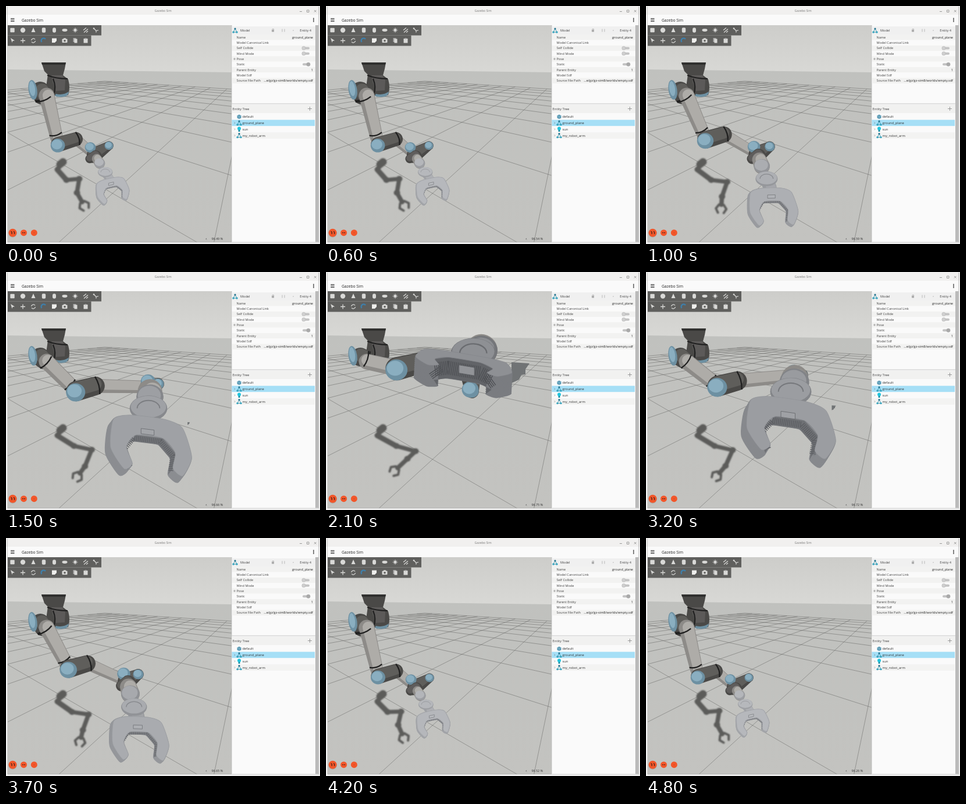
Recreate the animation shown at these times as an HTML page. Size 540 by 409 pixels, loop 4.9 s.

```html
<!DOCTYPE html>
<html lang="en">
<head>
<meta charset="utf-8">
<title>Robot arm simulation</title>
<style>
  html, body { margin: 0; width: 100%; height: 100%; overflow: hidden; background: #fafafa; }
  svg { display: block; width: 540px; height: 409px; font-family: "Open Sans", "Noto Sans", sans-serif; }
</style>
</head>
<body>
<svg viewBox="0 0 540 409" xmlns="http://www.w3.org/2000/svg">
  <defs>
    <linearGradient id="sky" x1="0" y1="0" x2="0" y2="1">
      <stop offset="0" stop-color="#cdcdca"/><stop offset="1" stop-color="#d9d9d6"/>
    </linearGradient>
    <linearGradient id="ground" x1="0" y1="0" x2="0" y2="1">
      <stop offset="0" stop-color="#c0c1be"/><stop offset="1" stop-color="#c3c3c0"/>
    </linearGradient>
    <clipPath id="view"><rect x="3" y="33" width="385" height="373"/></clipPath>
    <filter id="soft" x="-20%" y="-20%" width="140%" height="140%"><feGaussianBlur stdDeviation="1.1"/></filter>
  </defs>
  <g clip-path="url(#view)">
    <rect x="3" y="33" width="385" height="87" fill="url(#sky)"/>
    <path d="M3 109L388 114V406H3Z" fill="url(#ground)"/>
    <path id="grid" fill="none" stroke="#60615f" stroke-width=".5"/>
    <g id="shadow" filter="url(#soft)"/>
    <g id="arm"/>
  </g>
  <g id="ui"/>
  <text id="percent" x="373" y="402" font-size="5.4" fill="#333" text-anchor="end"/>
</svg>
<script>
const $ = id => document.getElementById(id);
const LOOP = 4900, STEP = 100;
const RISE_START = 600, RISE_END = 2060, FALL_START = 2770;

const DARK = "#4a4947", DARK_LIT = "#646361", BLUE = "#6d90a2", BLUE_LIT = "#8aaec0";
const TUBE = "#8d8b88", TUBE_LIT = "#b7b5b1", SHADE = "#5c5c5a";

const mix = (a, b, k) => a + (b - a) * k;
const clamp = (v, lo = 0, hi = 1) => Math.min(hi, Math.max(lo, v));
const between = (p, q, k) => [mix(p[0], q[0], k), mix(p[1], q[1], k)];
const add = (p, x, y) => [p[0] + x, p[1] + y];
const polar = (p, r, degrees) => add(p, r * Math.cos(degrees * Math.PI / 180), r * Math.sin(degrees * Math.PI / 180));
const grey = v => `rgb(${v},${v + 2},${v + 6})`;
const bezier = (s, ...pts) => {
  while (pts.length > 1) pts = pts.slice(1).map((p, i) => between(pts[i], p, s));
  return pts[0];
};

// Drawing helpers
const path = (d, fill, more = "") => `<path d="${d}" fill="${fill}" ${more}/>`;
const line = (d, color, w, more = "") => path(d, "none", `stroke="${color}" stroke-width="${w}" ${more}`);
const poly = pts => "M" + pts.map(p => p.join(" ")).join("L");
const rect = (x, y, w, h, fill, more = "") => `<rect x="${x}" y="${y}" width="${w}" height="${h}" fill="${fill}" ${more}/>`;
const oval = ([x, y], rx, ry, fill, more = "") => `<ellipse cx="${x}" cy="${y}" rx="${rx}" ry="${ry}" fill="${fill}" ${more}/>`;
const dot = (x, y, r, fill, more) => oval([x, y], r, r, fill, more);
const text = (x, y, s, size = 5.6, fill = "#404040", anchor = "start") =>
  `<text x="${x}" y="${y}" font-size="${size}" fill="${fill}" text-anchor="${anchor}">${s}</text>`;

function limb(a, ar, b, br, fill, light) {
  const len = Math.hypot(b[0] - a[0], b[1] - a[1]) || 1;
  const nx = (a[1] - b[1]) / len, ny = (b[0] - a[0]) / len;
  const capsule = (size, shift) => {
    const end = (p, r, side) => add(p, nx * r * (size * side + shift), ny * r * (size * side + shift));
    const arc = (r, to) => `A${r * size} ${r * size} 0 0 1 ${to}`;
    return `M${end(a, ar, 1)}${arc(ar, end(a, ar, -1))}L${end(b, br, -1)}${arc(br, end(b, br, 1))}Z`;
  };
  return path(capsule(1, 0), fill) + path(capsule(.72, -.2), light, 'opacity=".8"');
}
function ring(a, b, k, r) {
  const len = Math.hypot(b[0] - a[0], b[1] - a[1]) || 1;
  const tx = (b[0] - a[0]) / len, ty = (b[1] - a[1]) / len, p = between(a, b, k);
  return line(`M${add(p, -ty * r, tx * r)}Q${add(p, tx * 5, ty * 5)} ${add(p, ty * r, -tx * r)}`, "#1f1f1f", 2.3);
}
function smooth(pts) {
  const n = pts.length, at = i => pts[(i + n) % n], t = .11;
  const handle = (p, a, b) => add(p, (b[0] - a[0]) * t, (b[1] - a[1]) * t);
  return `M${pts[0]}` + pts.map((p, i) =>
    `C${handle(p, at(i - 1), at(i + 1))} ${handle(at(i + 1), at(i + 2), p)} ${at(i + 1)}`).join("") + "Z";
}
const cap = (p, r) => oval(p, r, r * .95, BLUE) + oval(add(p, -r * .12, -r * .15), r * .75, r * .68, BLUE_LIT);

// Joint layout for lift s: 0 hanging down, 1 reaching forward
function layout(s) {
  const shoulder = [66, 148];
  const elbow = polar(shoulder, 93 - 34 * s ** 1.3, 75 - 57 * s);
  const wrist = bezier(s, [152, 256], [240, 283], [285, 108], [248, 165]);
  const neck = bezier(s, [178, 297], [269, 375], [239, 150], [240, 141]);
  const across = bezier(s, [27, -6], [55, 4], [93, 16], [83, 14]);
  const swing = s ** 4;
  return {
    s, shoulder, elbow, wrist, neck, across,
    forward: bezier(s, [10, 38], [10, 88], [16, 138], [-5, 28]),
    depth: bezier(s, [-1, 2], [-5, 3], [-16, 12], [-2, 36]),
    elbowEnd: add(elbow, 30 + 6 * s, -9),
    roll: add(between(wrist, neck, .35), 22 * swing, -22 * swing),
    flange: add(between(wrist, neck, .72), 11 * swing, -8 * swing),
    capTop: add(wrist, -7 * (1 - s), 50 * swing - 13),
    capSide: add(wrist, 25 - 22 * s, 16 * s - 16 + 40 * swing),
    size: 13 + 7 * s ** .7,
    span: Math.hypot(...across),
    tone: Math.round(182 - 40 * s ** .8)
  };
}

function base(toward) {
  const start = [59, 146], len = Math.hypot(toward[0] - 59, toward[1] - 146);
  return path("M61 97H103L101 108L98 119L107 126Q111 140 107 153L88 156L68 146L72 118L66 112Z", DARK) +
    path("M61 97H103L102 101H62Z", "#30302f") +
    path("M78 119L97 119L102 128L101 145L85 146L80 130Z", DARK_LIT, 'opacity=".7"') +
    line("M71 119Q86 125 106 125M81 125Q87 140 82 152", "#202020", 2.2) +
    path("M86 151Q98 154 108 147Q107 156 98 156Q88 157 84 154Z", BLUE) +
    limb(start, 16, between(start, toward, 9 / len), 15, DARK, DARK_LIT) + ring(start, toward, 13 / len, 14) +
    oval([46, 144], 7.5, 17, BLUE, 'transform="rotate(-8 46 144)"') +
    oval([45, 142], 5, 13, BLUE_LIT, 'transform="rotate(-8 45 142)"');
}

// A flat two-jaw plate in the across/forward plane, extruded along depth
function gripper({ s, neck, across, forward, depth, tone }) {
  const place = ([x, y]) => add(neck, across[0] * x + forward[0] * y, across[1] * x + forward[1] * y);
  const half = [[.42, 0], [.85, .12], [1, .65], [.72, 1.02], [.5, .9], [.6, .6], [.33, .36]];
  const right = half.map(place), left = half.map(([x, y]) => place([-x, y]));
  const outline = smooth([...left, ...right.reverse()]);
  const inner = [...left.slice(4), ...right.slice(0, 3)];
  const under = k => inner.map(p => add(p, depth[0] * k, depth[1] * k));
  const layers = Array.from({ length: 10 }, (_, i) => 1 - i / 10).map(k =>
    path(outline, grey(tone - 20), `transform="translate(${depth[0] * k} ${depth[1] * k})" stroke="${grey(tone - 20)}" stroke-width="2"`));
  const slot = add(place([.05, .2]), depth[0] * .6, depth[1] * .6), [sx, sy] = [across[0] * .16, across[1] * .16];
  const h = 2 + 5 * s;
  const slotShape = poly([add(slot, -sx, -sy - h), add(slot, sx, sy - h), add(slot, sx, sy + h), add(slot, -sx, h - sy)]) + "Z";
  return path("M-4 0L27 2L20 12V21L13 22L9 30L-4 36Z", "#707375", `transform="translate(${place([1, 0])}) scale(${s ** 3})"`) +
    layers.join("") +
    path(poly([...inner, ...under(1).reverse()]) + "Z", grey(tone - 44)) +
    line(poly(under(.5)), grey(tone - 62), Math.hypot(...depth) * .65, 'stroke-dasharray="1.5 1.7"') +
    path(outline, grey(tone), `stroke="${grey(tone - 12)}" stroke-width=".6"`) +
    path(slotShape, grey(tone + 4), `stroke="${grey(tone - 50)}" stroke-width=".9"`);
}

function drawArm(pose) {
  const { s, shoulder, elbow, elbowEnd, wrist, roll, flange, capTop, capSide, size, span, tone, neck } = pose;
  const tubeEnd = between(shoulder, elbow, .86), fr = span * .46, thin = 8 + 5 * s;
  $("arm").innerHTML =
    base(tubeEnd) + limb(add(shoulder, 4, 6), 13.5, tubeEnd, 11 + 3 * s, TUBE, TUBE_LIT) + ring([59, 146], tubeEnd, .18, 14) +
    limb(elbowEnd, thin + 1.5, wrist, thin, TUBE, TUBE_LIT) +
    ring(shoulder, elbow, .8, 11 + 3 * s) +
    limb(elbow, size, elbowEnd, size * .92, DARK, DARK_LIT) + ring(elbow, elbowEnd, 1.1, size * .9) +
    cap(add(elbow, -1, 2), size * .95) +
    limb(wrist, size, capSide, size * .6, DARK, DARK_LIT) + cap(capSide, size * .58) +
    cap(capTop, size * .72) +
    limb(add(wrist, -size * .6, size * .5), size * .6, add(wrist, 2, 3), size * .85, DARK, DARK_LIT) +
    limb(between(wrist, roll, .45), span * .3, roll, span * .33, TUBE, TUBE_LIT) +
    oval(roll, span * .33, span * .3, grey(tone - 26)) + oval(add(roll, -1, -2), span * .28, span * .24, grey(tone - 2)) +
    limb(flange, fr * .62, neck, fr * .6, grey(tone - 22), grey(tone - 4)) +
    oval(flange, fr, fr * .68, grey(tone - 24)) + oval(add(flange, 0, -fr * .08), fr * .94, fr * .58, grey(tone)) +
    line(`M${add(flange, -fr * .6, 0)}A${fr * .6} ${fr * .42} 0 0 1 ${add(flange, fr * .6, 0)}`, grey(tone - 36), fr * .06) +
    gripper(pose);
}

function drawShadow(s) {
  const bump = Math.sin(Math.PI * s), early = s ** .4;
  const top = [98, 268], bend = [88, 281];
  const elbow = [104 + 17 * early, 299], wrist = [126 + 28 * early, 297 + 11 * early];
  const hand = [122 + 18 * early, 321 + 13 * bump], tool = [131 - 8 * s, 337 + 9 * bump];
  const len = Math.hypot(tool[0] - hand[0], tool[1] - hand[1]);
  const tx = (tool[0] - hand[0]) / len, ty = (tool[1] - hand[1]) / len;
  const jaw = (f, side) => add(tool, tx * f - ty * side, ty * f + tx * side);
  const stroke = (pts, w) => line(poly(pts), SHADE, w, 'stroke-linecap="round" stroke-linejoin="round"');
  $("shadow").innerHTML =
    stroke([top, [93, 272]], 13) + stroke([bend, elbow], 9) + stroke([top, bend], 8) + stroke([elbow, wrist], 7) + stroke([wrist, hand, tool], 7.5) +
    [elbow, wrist, hand].map(p => oval(p, 5.5, 5, SHADE)).join("") +
    stroke([jaw(14, -5), jaw(7, -9), jaw(0, -4), jaw(0, 4), jaw(7, 9), jaw(14, 5)], 4);
}

// Ground plane: a square lattice seen in two-point perspective
function drawGrid() {
  const alpha = .0335, beta = .0525, size = 20;
  const project = (a, b) => {
    const w = 1 - alpha * a - beta * b;
    return [(170 + 190 * alpha * a - 420 * beta * b) / w, (129 - 106 * (alpha * a + beta * b)) / w];
  };
  let d = "";
  for (let i = 0; i <= size; i++) {
    const endB = Math.min(size, (.98 - alpha * i) / beta), endA = Math.min(size, (.98 - beta * i) / alpha);
    if (endB > 0) d += poly([project(i, 0), project(i, endB)]);
    if (endA > 0) d += poly([project(0, i), project(endA, i)]);
  }
  $("grid").setAttribute("d", d);
}

function windowFrame() {
  return rect(0, 0, 540, 15, "#f1f0ef") + rect(0, 15, 540, 18, "#fafafa") + rect(0, 33, 3, 376, "#f4f4f4") +
    rect(2, 1, .7, 405, "#bdbdbd") + rect(3, 406, 537, 3, "#eeeeee") + rect(3, 405.5, 535, .7, "#a9a9a9") +
    text(270, 10, "Gazebo Sim", 5.3, "#777", "middle") + text(27, 26.5, "Gazebo Sim", 6.7, "#222") +
    line("M8 21.5H14.5M8 24H14.5M8 26.5H14.5", "#222", 1) +
    [21.5, 24, 26.5].map(y => dot(529, y, .9, "#222")).join("") +
    line("M505 9.5H509M517.5 7H521V10.5H517.5ZM530 7L533.5 10.5M533.5 7L530 10.5", "#777", .7);
}

function toolbars() {
  const pale = "#d9d9d7", bar = "#5f5f5d";
  const icons = [
    [rect(-3.7, -3.7, 7.4, 7.4, pale, 'rx="1"'), dot(0, 0, 4.2, pale), path("M0 -4.5L3.5 3.5H-3.5Z", pale),
      rect(-3.2, -4.2, 6.4, 8.4, pale, 'rx="2"'), rect(-3, -4.2, 6, 8.4, pale, 'rx="3"'), oval([0, 0], 4.5, 2.4, pale),
      dot(0, 0, 2.4, pale) + line("M0 -4.5V4.5M-4.5 0H4.5M-3 -3L3 3M3 -3L-3 3", pale, .8),
      line("M-4 0L1 -4M-3 4L4 -2M1 4L4 1.5", pale, 1.2), line("M-4 -3L0 1L4 0M0 1V4", pale, 1.2) + dot(-4, -3, 1.3, pale)],
    [path("M-3 -4.5L4 0L.5 .5L-.5 3.5Z", pale), line("M-4 0H4M0 -4V4", pale, 1.3),
      line("M-3.5 -.5A3.6 3.6 0 0 1 3 -2M3.5 .5A3.6 3.6 0 0 1 -3 2", pale, 1.3), line("M-3.5 2.5A4 4 0 0 1 3 -2.5", "#3e7fab", 2.4),
      rect(-4, -4, 8, 7.5, "#eeeeec") + path("M1 3.5L4 .5V3.5Z", "#555"),
      rect(-4.5, -3, 9, 6.5, pale, 'rx="1"') + rect(-2, -4.2, 4, 2, pale) + dot(0, .3, 1.8, bar),
      rect(-3.5, -4.5, 5, 7, "#aaa") + rect(-1.5, -3, 5, 7, pale), rect(-3.5, -3.5, 7, 7.5, pale) + rect(-1.5, -4.5, 3, 2, "#aaa")]
  ];
  return rect(3, 33, 161, 17.5, bar) + rect(3, 50.5, 143.5, 18, bar) +
    icons.map((row, j) => row.map((icon, i) => `<g transform="translate(${11 + 18 * i} ${41.5 + 18 * j})">${icon}</g>`).join("")).join("");
}

const modelIcon = (x, y) => `<g transform="translate(${x} ${y})">` + line("M0 -3L-3 3H3Z", "#2f8fa8", .9) +
  dot(0, -3, 1.6, "#24738c") + dot(-3, 3, 1.7, "#36a3bd") + dot(3, 3, 1.7, "#36a3bd") + "</g>";

function inspector() {
  const toggle = (y, on) => rect(510, y - 2, 12, 4, "#c3c3c3", 'rx="2"') +
    dot(on ? 520 : 512, y, 3.2, on ? "#a9a9a9" : "#cfcfcf", 'stroke="#aaa" stroke-width=".4"');
  const rows = [["Name", "ground_plane"], ["Model Canonical Link"], ["Self Collide"], ["Wind Mode"], ["Pose"], ["Static"],
    ["Parent Entity", "1"], ["Model Sdf"], ["Source File Path", "…e/gz/gz-sim8/worlds/empty.sdf"]];
  const rowY = i => 53.8 + i * 9.3;
  return rect(388, 33, 150, 372.5, "#fafafa") + rect(387.6, 33, .8, 372, "#b9b9b9") + rect(388.5, 35, 144, 14, "#f0f0f0") +
    modelIcon(394, 42) + text(403, 44, "Model") + text(525, 44, "Entity 4", 5.7, "#404040", "end") +
    rect(457, 41, 4, 3.4, "#aaa") + line("M458 41V39.5H460.5V41M475 39.5V44.5M479 39.5V44.5", "#aaa", .8) + dot(494, 42, .7, "#aaa") +
    rows.map(([label, value = ""], i) => rect(388.5, rowY(i) - 4.6, 144, 9.3, i % 2 ? "#fafafa" : "#f2f2f1") +
      text(396.5, rowY(i) + 2, label) + text(528, rowY(i) + 2, value, 5.6, "#222", "end")).join("") +
    toggle(rowY(2)) + toggle(rowY(3)) + toggle(rowY(5), true) + line("M391 91H395M393 89V93", "#777", .6);
}

function entityTree() {
  const cube = path("M401 186.5L404.5 188.3V192.5L401 194.3L397.5 192.5V188.3Z", "#5c9bb5") +
    line("M397.5 188.3L401 190L404.5 188.3M401 190V194", "#9acbdc", .5);
  const bulb = dot(401, 210.5, 3, "#20c5dd") + rect(399.6, 213, 2.8, 3, "#1590a5");
  return rect(388.5, 167.5, 149, .8, "#bdbdbd") + rect(388.5, 169, 144, 15, "#f1f1f0") + text(389.5, 179, "Entity Tree", 5.9) +
    line("M519 176.5H526M522.5 173V180", "#777", .7) +
    ["default", "ground_plane", "sun", "my_robot_arm"].map((label, i) => {
      const y = 190.2 + i * 10.8;
      return rect(388.5, y - 5.4, 142.5, 10.8, i === 1 ? "#a6dff6" : i % 2 ? "#f3f3f2" : "#fafafa") + text(406.5, y + 2.2, label, 5.8, "#333") +
        (i ? line(`M392.5 ${y - 1.5}L394 ${y}L392.5 ${y + 1.5}`, "#777", .6) : "") + (i % 2 ? modelIcon(401, y) : "");
    }).join("") + cube + bulb + rect(532, 33, 5.5, 372.5, "#bababa") + rect(537.5, 1, .8, 405, "#aaaaaa");
}

function playback() {
  return dot(11.5, 390.5, 7.2, "#777", 'opacity=".35"') +
    [11.5, 30.5, 48.3].map((x, i) => dot(x, 389.7, i ? 5.5 : 7, "#f2562a")).join("") +
    line("M8.5 387.2L10 388.5V392M13 387.2L14.5 388.5V392M28 389.7H30M31 389.7H33", "#4a251b", 1.3) +
    dot(48.3, 389.7, .7, "#c44220") + line("M345 399L343.8 400.3L345 401.6", "#444", .7);
}

const lift = t => {
  const time = t < FALL_START ? t : RISE_END - (t - FALL_START);
  return clamp((time - RISE_START) / (RISE_END - RISE_START)) ** 1.4;
};
const realTimeFactor = t => t < 2100
  ? 96.49 + .26 * (t / 2100) ** 1.3
  : 96.75 - .49 * ((t - 2100) / 2700) ** 3;

function render(t) {
  const s = lift(t);
  drawShadow(s);
  drawArm(layout(s));
  $("percent").textContent = realTimeFactor(t).toFixed(2) + " %";
}

drawGrid();
$("ui").innerHTML = windowFrame() + toolbars() + inspector() + entityTree() + playback();
const start = performance.now();
let shown = -1;
function tick() {
  const step = Math.floor((performance.now() - start) / STEP);
  if (step !== shown) render((step * STEP) % LOOP);
  shown = step;
  requestAnimationFrame(tick);
}
tick();
</script>
</body>
</html>
```
